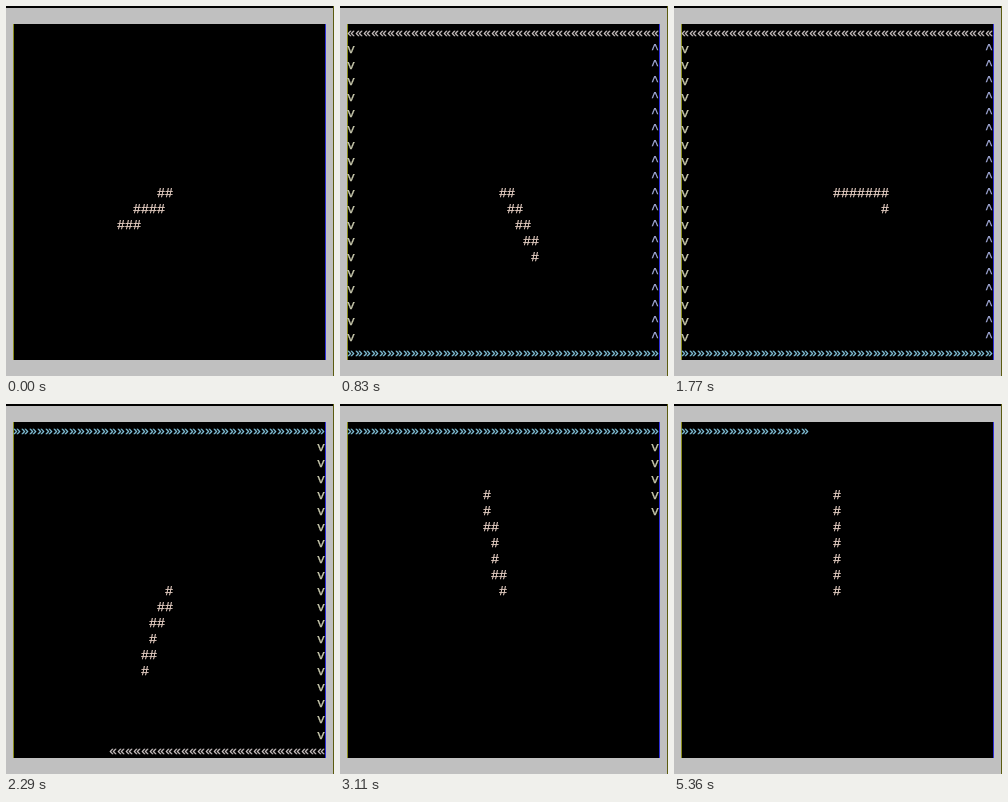
Recreate the animation shown at these times as an HTML page. Size 328x370 px, loop 6.58 s.

```html
<!DOCTYPE html>
<html lang="en">
<head>
<meta charset="utf-8">
<title>Terminal pendulum</title>
<style>
  html, body { margin: 0; width: 100%; height: 100%; overflow: hidden; background: #c0c0c0; }
  svg { display: block; width: 328px; height: 370px; }
  text { font: 13.333px "Liberation Mono", monospace; white-space: pre; stroke-width: 0.25px; }
</style>
</head>
<body>
<svg id="stage" viewBox="0 0 328 370">
  <rect width="328" height="370" fill="#c0c0c0"/>
  <rect width="328" height="2"/>
  <rect x="327" width="1" height="370" fill="#5c5c10"/>
  <rect x="7" y="18" width="313" height="336"/>
  <rect x="7" y="18" width="1" height="336" fill="#8a8c1c"/>
  <rect x="319" y="18" width="1" height="336" fill="#3030d8"/>
</svg>
<script>
const LOOP = 6580, TICK = 63.8, LAST_TICK = 84;
const COLS = 39, ROWS = 21;
const PIVOT = { col: 19, row: 10 }, ARM = 6;
const INK = { '#': '#f0d8cc', '«': '#ccc4c4', '»': '#84c4dc', 'v': '#ccccb0', '^': '#a8b0e0' };

// Key poses: [tick, value, rate per tick]
// Arm angle in degrees clockwise from upright
const ANGLE = [[0, 249, 0], [13, 133, -11.8], [22.7, 78.5, 0], [28, 95, 5.6],
  [36, 213.2, 18.8], [49, 338.2, 2.4], [62, 355, 0.15], [LAST_TICK, 357, 0]];

// Border cells lit; negative runs counterclockwise, overshoot fills the border
const TORQUE = [[0, 0, -2], [13, -116, -20], [28, -116, 30], [36, 85, 20],
  [49, 44, -1.2], [62, 29, -1.2], [71, 18, -0.4], [LAST_TICK, 16, 0]];

function curve(keys, x) {
  const i = Math.max(1, keys.findIndex(k => k[0] > x));
  const end = x >= LAST_TICK ? keys.length - 1 : i;
  const [x0, y0, v0] = keys[end - 1], [x1, y1, v1] = keys[end];
  const f = (x - x0) / (x1 - x0), g = 1 - f;
  return y0 * g * g * (1 + 2 * f) + y1 * f * f * (1 + 2 * g)
    + (x1 - x0) * f * g * (v0 * g - v1 * f);
}

const stage = document.getElementById('stage');

function glyph() {
  const el = document.createElementNS('http://www.w3.org/2000/svg', 'text');
  stage.appendChild(el);
  return el;
}

function place(el, col, row) {
  el.setAttribute('x', 7 + col * 8);
  el.setAttribute('y', 31 + row * 16);
}

function write(el, char) {
  if (el.textContent === char) return;
  el.textContent = char;
  if (!char) return;
  el.setAttribute('fill', INK[char]);
  el.setAttribute('stroke', INK[char]);
}

// Border cells in clockwise order from the top left
const border = [];
function edge(length, at, cw, ccw) {
  for (let i = 0; i < length; i++) {
    const el = glyph();
    place(el, ...at(i));
    border.push({ el, cw, ccw });
  }
}
edge(COLS, i => [i, 0], '»', '«');
edge(ROWS - 2, i => [COLS - 1, i + 1], 'v', '^');
edge(COLS, i => [COLS - 1 - i, ROWS - 1], '«', '»');
edge(ROWS - 2, i => [0, ROWS - 2 - i], '^', 'v');

const arm = Array.from({ length: 14 }, glyph);

function armCells(degrees) {
  const a = degrees * Math.PI / 180, cells = new Map();
  for (let r = 0; r <= ARM; r += 0.01) {
    const col = PIVOT.col + Math.round(r * Math.sin(a));
    const row = PIVOT.row - Math.round(r * Math.cos(a));
    cells.set(row * COLS + col, [col, row]);
  }
  return [...cells.values()];
}

function draw(ms) {
  const tick = Math.min(LAST_TICK, Math.floor(ms / TICK + 0.39));
  const lit = Math.ceil(curve(TORQUE, tick));
  border.forEach(({ el, cw, ccw }, i) => {
    write(el, i < lit ? cw : i >= border.length + Math.min(lit, 0) ? ccw : '');
  });
  const cells = armCells(curve(ANGLE, tick));
  arm.forEach((el, i) => {
    if (cells[i]) place(el, ...cells[i]);
    write(el, cells[i] ? '#' : '');
  });
}

const start = performance.now();
function loop() {
  draw((performance.now() - start) % LOOP);
  requestAnimationFrame(loop);
}
loop();
</script>
</body>
</html>
```
